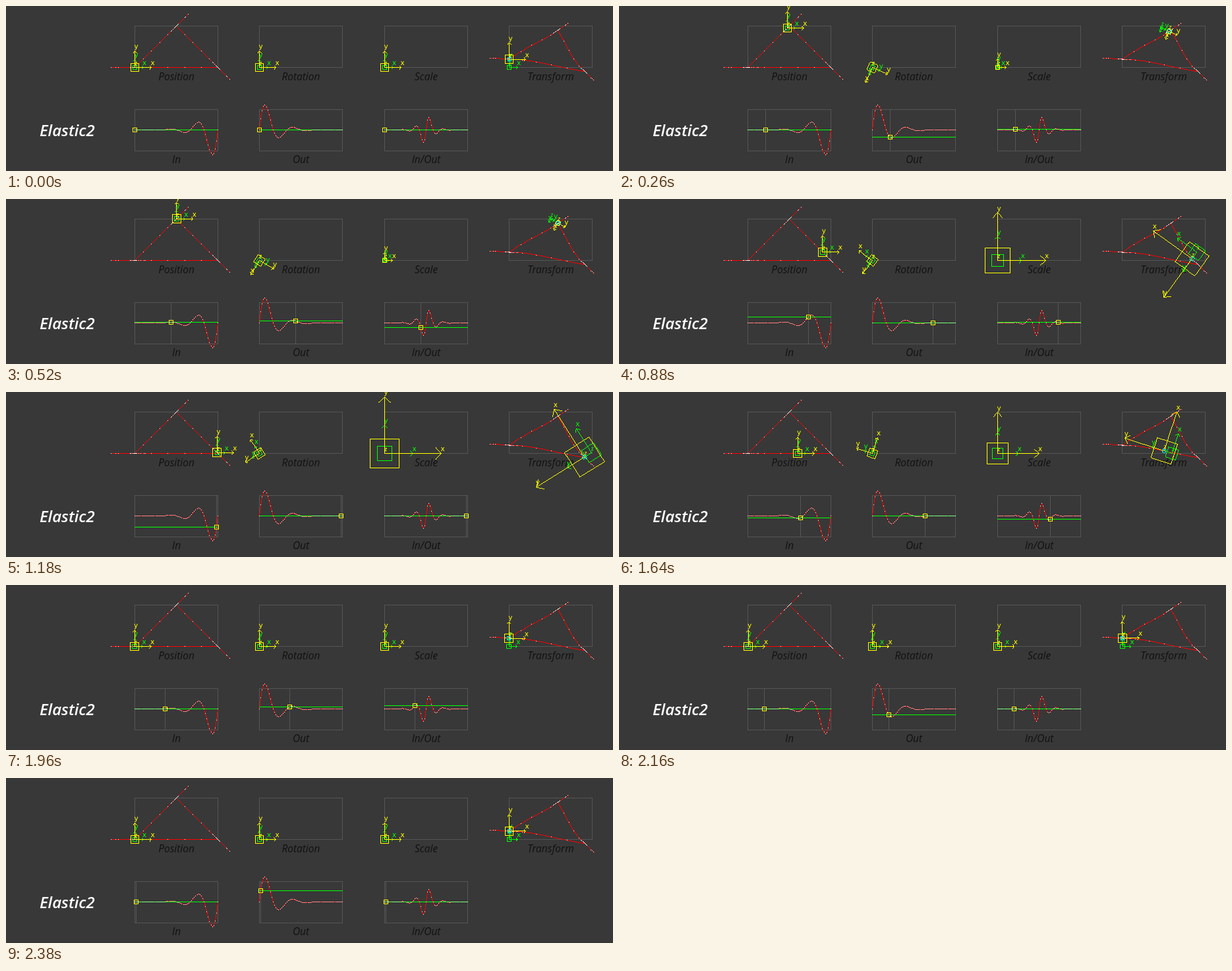
These frames come from a looping animation (921 px wide and 251 px high, 2400 ms). An HTML page with a canvas:

```html
<!DOCTYPE html>
<html lang="en">
<head>
<meta charset="utf-8">
<title>Elastic2</title>
<style>
html, body { margin: 0; width: 100%; height: 100%; overflow: hidden; background: #383838; }
canvas { display: block; }
</style>
</head>
<body>
<canvas id="stage" width="921" height="251"></canvas>
<script>
const ctx = document.getElementById('stage').getContext('2d');
const LOOP = 2400, STEP = 20, SEGMENT = 800, RAMP = 100;
const W = 126, H = 63, TOP = 30.5, BOTTOM = 157.5, BASE = TOP + H;
const columns = [195.5, 384.5, 574.5, 763.5];
const BG = '#383838', GRAY = '#555', RED = '#f00', WHITE = '#fff';
const YELLOW = '#ff0', GREEN = '#0f0', CYAN = '#0ff';
const PEAK = 0.287;

const lerp = (a, b, v) => a + (b - a) * v;
const mix = (p, q, v) => [lerp(p[0], q[0], v), lerp(p[1], q[1], v)];

// Keyed values; positions are relative to the lower left panel corner.
const corners = [[0, 0], [W / 2, -H], [W, 0], [0, 0]];
const scales = [1, 0.5, 3.5, 1];
const overshoots = [[89.5, -67.5], [128.5, 19.5], [-29.5, -14.5]];

// Elastic wave curves
const waveOut = u => 2 ** (-10 * u) * Math.sin(6 * Math.PI * u);
const waveIn = u => -waveOut(1 - u);
const waveInOut = u => (u < 0.5 ? waveIn(2 * u) : waveOut(2 * u - 1)) / 2;
const graphs = [['In', waveIn], ['Out', waveOut], ['In/Out', waveInOut]];

// Linear ramp followed by a damped swing around the key
function progress(ms) {
  if (ms <= RAMP) return ms / RAMP;
  const s = ms - RAMP;
  return 1 + 0.42 * Math.exp(-0.0093 * s) * Math.sin(s * Math.PI / 87.5);
}

const cornerAt = (k, v) => mix(corners[k], corners[k + 1], v);
const angleAt = (k, v) => (k + v) * 2 * Math.PI / 3;
const scaleAt = (k, v) => lerp(scales[k], scales[k + 1], v);
const armAt = a => [12.5 * Math.sin(a), -12.5 * Math.cos(a)];

function orbitAt(k, v) {
  const c = Math.min(v, 1);
  const p = cornerAt(k, c), arm = armAt(angleAt(k, c));
  const q = [p[0] + arm[0], p[1] + arm[1]];
  return v > 1 ? mix(q, overshoots[k], (v - 1) / PEAK) : q;
}

function pixel(x, y, color) {
  ctx.fillStyle = color;
  ctx.fillRect(Math.floor(x), Math.floor(y), 1, 1);
}

// Hard-edged polyline, one pixel wide
function stroke(points, color) {
  for (let i = 1; i < points.length; i++) {
    const a = points[i - 1], b = points[i];
    const n = Math.ceil(Math.max(Math.abs(b[0] - a[0]), Math.abs(b[1] - a[1]), 1));
    for (let j = 0; j <= n; j++) {
      const p = mix(a, b, j / n);
      pixel(p[0], p[1], color);
    }
  }
}

function box(x, y, w, h, color) {
  ctx.strokeStyle = color;
  ctx.strokeRect(x, y, w, h);
}

function text(str, x, y, font, color, align = 'center') {
  ctx.font = font;
  ctx.fillStyle = color;
  ctx.textAlign = align;
  ctx.fillText(str, x, y);
}

const caption = (str, x, y) =>
  text(str, x, y, 'italic 15.5px "Open Sans", sans-serif', '#111');

function trail(x, pathAt) {
  for (let k = 0; k < 3; k++) {
    const place = v => {
      const p = pathAt(k, v);
      return [x + p[0], BASE + p[1]];
    };
    const line = [];
    for (let i = 0; i <= 24; i++) line.push(place(i / 24 * (1 + PEAK)));
    stroke(line, RED);
    for (let ms = 0; ms < SEGMENT; ms += STEP) pixel(...place(progress(ms)), WHITE);
  }
}

function square(x, y, half, angle, color) {
  const c = Math.cos(angle) * half, s = Math.sin(angle) * half;
  const first = [x + c - s, y + s + c];
  stroke([first, [x - c - s, y - s + c], [x - c + s, y - s - c],
          [x + c + s, y + s - c], first], color);
}

function axis(x, y, len, angle, name, color) {
  const c = Math.cos(angle), s = Math.sin(angle), h = Math.max(2, len * 0.1);
  const tx = x + c * len, ty = y + s * len;
  stroke([[x, y], [tx, ty]], color);
  stroke([[tx - h * (c - s), ty - h * (s + c)], [tx, ty],
          [tx - h * (c + s), ty - h * (s - c)]], color);
  text(name, tx + 2, ty - 3.5, '10.5px "DejaVu Sans", sans-serif', color);
}

function gizmo(x, y, size, angle, color) {
  square(x, y, 6.4 * size, angle, color);
  axis(x, y, 25 * size, angle, 'x', color);
  axis(x, y, 25 * size, angle - Math.PI / 2, 'y', color);
  text('z', x + 1.5, y - 3.5, '8px "DejaVu Sans", sans-serif', color);
}

function pair(x, y, size, angle, cx = x, cy = y) {
  gizmo(cx, cy, size / 2, angle, GREEN);
  gizmo(x, y, size, angle, YELLOW);
}

function drawTracks(time) {
  const k = Math.floor(time / SEGMENT), v = progress(time % SEGMENT);
  const angle = angleAt(k, v), size = scaleAt(k, v);
  const [px, rx, sx, tx] = columns;

  ['Position', 'Rotation', 'Scale', 'Transform'].forEach((name, i) => {
    box(columns[i], TOP, W, H, GRAY);
    caption(name, columns[i] + 63, 112.5);
  });

  trail(px, cornerAt);
  trail(tx, orbitAt);

  const p = cornerAt(k, v);
  pair(px + p[0], BASE + p[1], 1, 0);
  pair(rx, BASE, 1, angle);
  pair(sx, BASE, size, 0);

  const q = orbitAt(k, v), arm = armAt(angle);
  const x = tx + q[0], y = BASE + q[1];
  pair(x, y, size, angle, x - arm[0], y - arm[1]);
  square(x, y, 2.5, angle, CYAN);
}

function drawGraphs(time) {
  const u = 1 - Math.abs(1 - time / (LOOP / 2));
  const mid = BOTTOM + H / 2 - 0.5;
  graphs.forEach(([name, wave], i) => {
    const x = columns[i], mx = Math.floor(x + W * u) + 0.5;
    const yAt = t => mid - H * wave(t);
    const my = Math.round(yAt(u) - 0.5) + 0.5;
    box(x, BOTTOM, W, H, GRAY);
    caption(name, x + 63, 239);
    stroke([[mx, BOTTOM], [mx, BOTTOM + H]], GRAY);

    const curve = [];
    for (let n = 0; n <= 60; n++) curve.push([x + W * n / 60, yAt(n / 60)]);
    stroke(curve, RED);
    stroke([[x, my], [x + W, my]], GREEN);
    curve.forEach(c => pixel(c[0], c[1], WHITE));
    box(mx - 3, my - 3, 6, 6, YELLOW);
  });
}

function frame(now) {
  const time = Math.floor((now % LOOP) / STEP) * STEP;
  ctx.fillStyle = BG;
  ctx.fillRect(0, 0, 921, 251);
  ctx.lineWidth = 1;
  text('Elastic2', 51, 198, 'italic 600 24px "Open Sans", sans-serif', WHITE, 'left');
  drawTracks(time);
  drawGraphs(time);
}

const start = performance.now();
function tick() {
  frame(performance.now() - start);
  requestAnimationFrame(tick);
}
tick();
</script>
</body>
</html>
```
